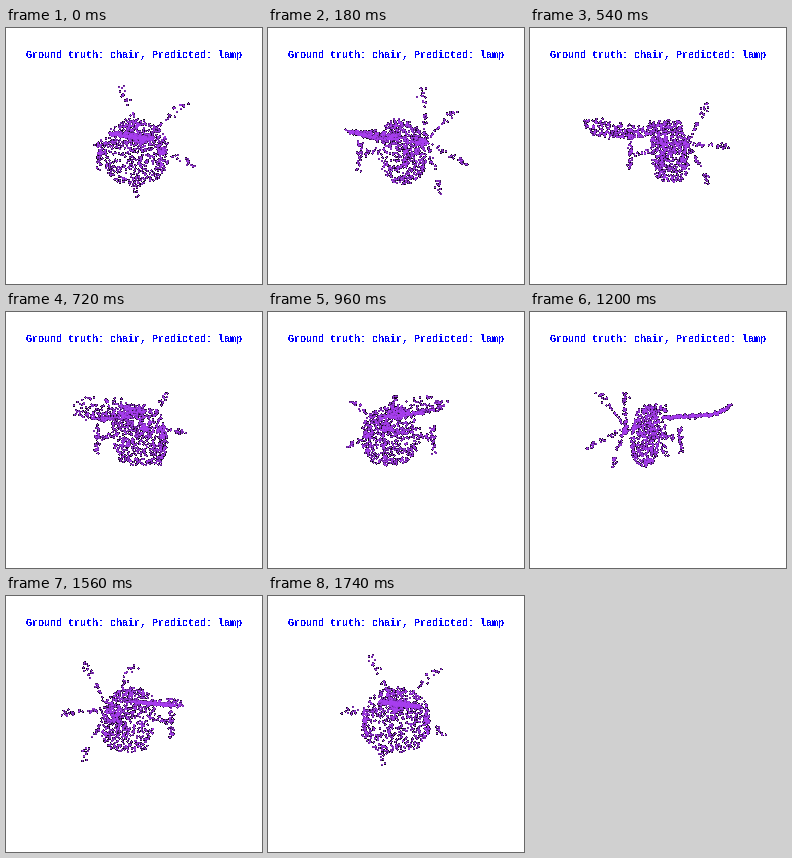
Write a matplotlib script that moves like this. It is 256 by 256 pixels and loops after 1.8 s.

```python
import numpy as np
import matplotlib.pyplot as plt
from matplotlib.animation import FuncAnimation

SIZE = 256
FRAMES = 30
STEP_MS = 60
DIST = 3.0
FOCAL = SIZE / 2 / np.tan(np.radians(30))
RADIUS = 1.3
PURPLE = np.array([168, 62, 240]) / 255

rng = np.random.default_rng(7)


def cloud(x, y, h, jitter=0.012):
    """Stack coordinates: x sideways, y vertical, h along the chair's axis."""
    pts = np.column_stack(np.broadcast_arrays(x, y, h))
    return pts + rng.normal(0, jitter, pts.shape)


def rod(a, b, n, jitter=0.015, lo=0.0, hi=1.0):
    t = rng.uniform(lo, hi, (n, 1))
    pts = np.array(a) * (1 - t) + np.array(b) * t
    return pts + rng.normal(0, jitter, pts.shape)


def seat(n=500):
    r = np.sqrt(rng.uniform(0, 1, n))
    a = rng.uniform(0, 2 * np.pi, n)
    x = 0.43 * r * np.sign(np.cos(a)) * np.abs(np.cos(a)) ** 0.85
    y = 0.05 + 0.42 * r * np.sign(np.sin(a)) * np.abs(np.sin(a)) ** 0.85
    under = rng.random(n) < 0.5
    bulge = 0.07 * (1 - r ** 4)
    h = np.where(under, 0.19 + bulge, 0.14 - 0.5 * bulge) - 0.12 * np.maximum(y, 0)
    return cloud(x, y, h)


def back(n=270):
    u = rng.uniform(0, 1, n)
    half = 0.32 * np.sqrt(1 - (2 * u - 1) ** 6)
    side = half * rng.uniform(-1, 1, n)
    y = 0.3 - 0.14 * side + 0.12 * u ** 7
    return cloud(side + 0.06, y, -0.1 - 0.83 * u, 0.01)


def arm(side):
    x = 0.45 * side
    pad = rod((x, 0.17, -0.2), (x, -0.2, -0.22), 34, 0.02)
    post = rod((x, 0.02, -0.2), (0.9 * x, 0.08, 0.12), 20, 0.02)
    return [pad, post]


def leg(tip):
    hub = (0, 0.18, 0.48)
    return [rod(hub, tip, 13, 0.014, 0.05, 0.45),
            rod(hub, tip, 6, 0.012, 0.45, 0.75),
            rod(hub, tip, 13, 0.024, 0.82, 1.06)]


TIPS = [(-0.258, 0.69, 0.62), (0.418, 0.565, 0.62), (-0.49, 0.123, 0.73),
        (0.467, -0.10, 0.76), (-0.142, -0.355, 0.77)]

parts = [seat(), back(), *arm(-1), *arm(1)]
for tip in TIPS:
    parts += leg(tip)
parts.append(cloud(rng.uniform(-0.12, 0.12, 45), rng.uniform(0.38, 0.47, 45),
                   rng.uniform(-0.12, 0.2, 45)))
parts.append(rod((0, 0.17, 0.28), (0, 0.18, 0.5), 26, 0.025))
X, Y, H = np.vstack(parts).T

OFFSETS = [(i, j) for i in range(-2, 3) for j in range(-2, 3)]


def render(frame):
    """Splat the turned cloud; soft discs fade to black at their rims."""
    a = 2 * np.pi * (frame + 1) / FRAMES
    side = H * np.sin(a) + X * np.cos(a)
    scale = FOCAL / (DIST - H * np.cos(a) + X * np.sin(a))
    sx, sy = SIZE / 2 + side * scale, SIZE / 2 - Y * scale
    through = np.ones((SIZE, SIZE))
    hit = np.zeros((SIZE, SIZE), bool)
    for i, j in OFFSETS:
        col, row = np.floor(sx).astype(int) + i, np.floor(sy).astype(int) + j
        d2 = ((col + 0.5 - sx) ** 2 + (row + 0.5 - sy) ** 2) / RADIUS ** 2
        on = d2 < 1
        np.multiply.at(through, (row[on], col[on]), d2[on])
        hit[row[on], col[on]] = True
    return np.where(hit[..., None], (1 - through)[..., None] * PURPLE, 1.0)


plt.rcParams["text.antialiased"] = False
fig = plt.figure(figsize=(SIZE / 100, SIZE / 100), dpi=100, facecolor="white")
ax = fig.add_axes([0, 0, 1, 1])
ax.axis("off")
image = ax.imshow(render(0), interpolation="nearest", aspect="auto",
                  extent=(0, SIZE, SIZE, 0))
ax.text(20, 30, "Ground truth: chair, Predicted: lamp", color="#0000ff",
        family="Liberation Mono", weight="bold", size=7.2, va="baseline")


def update(frame):
    image.set_data(render(frame))
    return [image]


anim = FuncAnimation(fig, update, frames=FRAMES, interval=STEP_MS, repeat=True,
                     repeat_delay=0)
plt.show()
```
